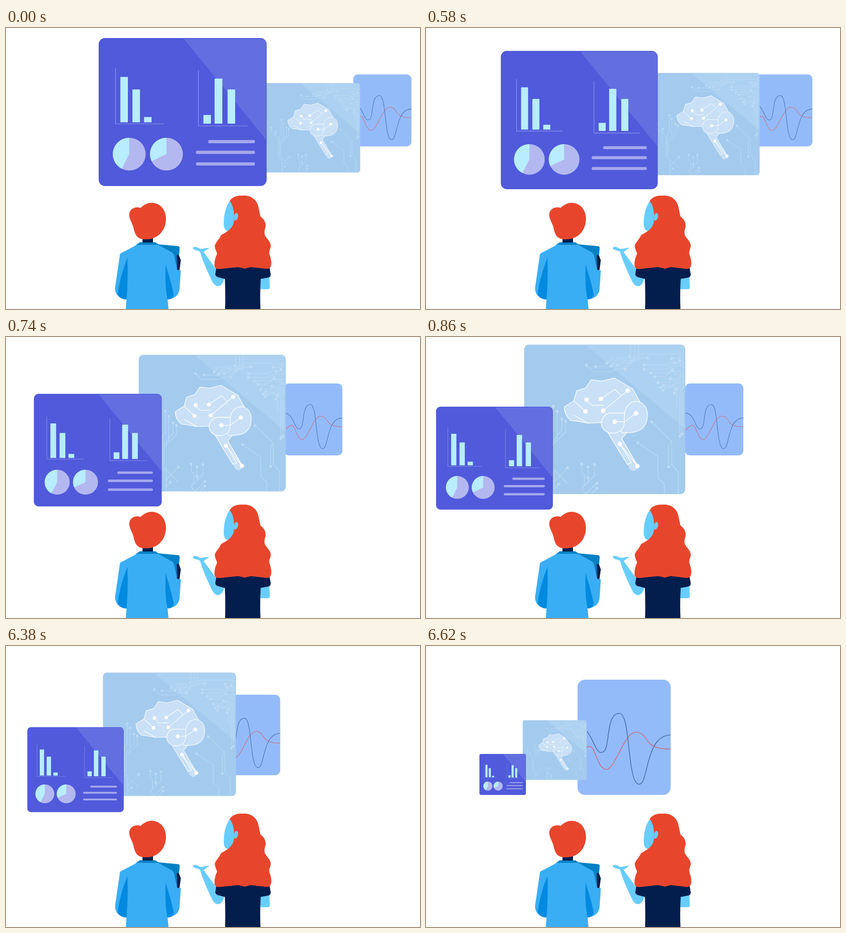
An HTML page that plays this animation: 907x617 px, repeating every 8000 ms.

```html
<!DOCTYPE html>
<html lang="en">
<head>
<meta charset="utf-8">
<title>Data panels</title>
<style>
  html, body { margin: 0; width: 100%; height: 100%; overflow: hidden; background: #fff; }
  svg { display: block; width: 100vw; height: 100vh; }
  .line { fill: none; }
  .hair { fill: #e8462c; }
  .navy { fill: #031e4d; }
  .skin { fill: #68cdfd; }
  .fold { fill: #028ae0; }
</style>
</head>
<body>
<svg viewBox="0 0 907 617">
  <defs>
    <marker id="dot" markerWidth="8" markerHeight="8" refX="4" refY="4" markerUnits="userSpaceOnUse">
      <circle cx="4" cy="4" r="3" fill="#c0dcf5"/>
    </marker>
    <clipPath id="screen"><rect x="215" y="16.5" width="353" height="328.5" rx="11"/></clipPath>
  </defs>

  <g id="waves">
    <rect x="332" y="74" width="204" height="253" rx="16" fill="#94bbf9"/>
    <g class="line" stroke-width="1.7">
      <path stroke="#c9707f" d="M332 240C343 230 350 220.500 359 220.500C371 221 376 271 395 271C415 271 434 189 460 189C477 189 483 207 490 214C500 223 515 227 536 226"/>
      <path stroke="#4473b0" d="M332 178C365 178 367 234 384 234C407 234 390 148 424 148C449 148 440 303.500 467 303.500C488 303.500 480 195 536 195.500"/>
    </g>
  </g>

  <g id="brain">
    <g clip-path="url(#screen)">
      <rect x="215" y="16.500" width="353" height="328.500" fill="#a4cbee"/>
      <path fill="#add2f1" d="M349 16.500H566V200Z"/>
      <g id="circuit" class="line" stroke="#c0dcf5" stroke-width="1.200"></g>
    </g>
    <g fill="#c9e0f6" stroke="#fff" stroke-width="1.400" stroke-linejoin="round">
      <path stroke="none" d="M398 209L443 283Q446 294 456 294Q465 291 466 283L429 223L440 210Z"/>
      <path d="M303 153L324 140L330 118L350 112L362 94L385 97L413 90L453 114L469 143L440 190L384 188L355 189L338 186L317 183Q303 171 303 153Z"/>
      <path d="M384 188Q389 167 405 167L435 167C438 151 448 142 460 141.500C477 142 486 156 485 173C484 198 470 213 431 210Z"/>
      <path d="M384 188Q389 167 405 167L435 167L434 190C434 203 423 211 409 211C393 211 384 200 384 188Z"/>
      <path class="line" d="M398 209L441 280L450 276L425 235L463 283.500L429 223L440 210M352 137.500L362 150H390M383 136L414 115L427 128M388 162L442 117.500M324 140L349.500 163.500M324 172L355 189M413.500 186H435L460 167.500"/>
    </g>
    <g id="nodes" fill="#fff"></g>
  </g>

  <g id="charts">
    <rect x="203" y="22" width="368" height="325" rx="14" fill="#505adb"/>
    <path fill="#636fe0" d="M390 24H557Q569.500 24 569.500 37V245Z"/>
    <path class="line" stroke="#949aea" stroke-width="1.200" d="M240 88V210.500H347M421.500 93V215H529"/>
    <path fill="#b7edff" d="M250.500 107.500h16.500V207h-16.500zM277 135h16.500V207h-16.500zM302.500 195.500h16.500V207h-16.500zM432.500 191h16.500V210h-16.500zM457 111h17V210h-17zM485.500 135h16.500V210h-16.500z"/>
    <g fill="#b4b8f0"><circle cx="270" cy="277" r="36"/><circle cx="351.500" cy="277" r="36"/></g>
    <path fill="#b7edff" d="M270 277L253.500 309A36 36 0 0 1 270 241ZM351.500 277L319 292.500A36 36 0 0 1 351.500 241Z"/>
    <path class="line" stroke="#a5a9ed" stroke-width="7" stroke-linecap="round" d="M446.500 249.500H542M419.500 273H542M419.500 298.500H542"/>
  </g>

  <g id="man">
    <path fill="#0680c5" d="M284 477L293 470.500H327L334 475L377 479Q381 480 380.500 484L376 531L340 520Z"/>
    <path class="navy" d="M299 460H322V471H299ZM374 499Q378 496 380 502L383 510L380 532H375Z"/>
    <path fill="#39aef4" d="M251 495L287 476H333L364 493Q367 495 368 499L375 531L383 532L380.500 570Q380 593 354 596L356 617H262.500L264 596Q238 592 239 570L249 502Q249 497 251 495Z"/>
    <path class="fold" d="M266 505C253 537 247 565 244.500 586Q251 596 264 596Q268 548 266 505ZM350 518C348 550 350 580 354 596Q365 596 367.500 586C363 560 354 535 350 518Z"/>
    <path class="hair" d="M295 395C302 388 312 383 322 384C341 386 351 402 350.500 421C349 447 331 465 305 464C290 464 283 457 280 441C277 428 270 420 270 410C270 398 282 391 295 395Z"/>
  </g>

  <g id="woman">
    <path class="skin" d="M409 483C412 479 418 480 423 484C430 487 437 482 446 483C440 486 437 489 433 492L460 529L478 551Q474 566 464 567Q456 566 451 555C440 532 431 512 425 491C420 488 410 488 409 483ZM556 547H577L578 569Q578 573.500 573 573.500H556ZM490 380C480 395 477 412 477 432Q478 444 486 446L506 430V390Z"/>
    <path class="navy" d="M461 524H577L580 541Q580 547 574 548L558 551Q556 585 557.500 617H480Q481 585 479.500 551L464 547Q457 544 459 538Z"/>
    <path class="hair" d="M490 380C496 371 505 368 515 368H524C542 369 551 382 553 393L557.500 414C566 420 570 428 568.500 438C566 445 566 448 567 455C572 464 581 470 580 480C578 488 576 490 577 496C580 505 582 512 581 520Q580 529 571 529L537 525Q530 526 523 528.500Q516 526 508 525L470 529Q458 530 457 523C456 515 458 505 462 497C463 492 459 490 457.500 480C457 472 466 467 471 455C482 449 499 440 499.500 422L500 412C499 397 496 387 490 380Z"/>
    <path class="skin" d="M500 412Q502 406 505 406Q509 407 508.500 414Q507 423 500 423Z"/>
  </g>
</svg>
<script>
const byId = id => document.getElementById(id);

// Circuit traces; the first point of each carries a dot.
const topTraces = `351.5 62L366 76H408L418 70H430L450 51H466V17|371.5 65H402L415 51H446L457 41V17
|396 58L408 46H440|406 64.5L414 57H446L466 37H565|420 62H426L437 51|436 71L460 46H485
|446 43L448 41V17|485 46H468|478 61.5H530L538 54H565|478 71H528L537 64H565|492 79H530L540 72
|501 87H524L536 76H565|538.5 47H552L557 42H565|556 51L565 60|544 58H556L565 67|540 72L548 83H565
|535 92H552L557 87H565|508 100H530L537 96H565|520 106H540L545 101H565|514 111H534L543 106H565
|519 117.5L525 111H565|544 123.5V114L550 108|556 218V120L565 111|561 213V122|549 115V152`;
const lowTraces = `494.5 186.5L538 229V280L553 296V345|531.5 285V238L538 229|464 232.5L508 262V310L522 322V345
|279 152V205L272 213V283L310 322|287 164V220L274 233|297.5 180V205L287 216|306 185.5V208L276 238V280
|242 181V196L268 222V285L281 298V345|258 197V212|310 287L281 317|291 323L281 333
|341 279V297L347 303V325L341 332L350 345|355 285.5V309|369 280V304L346 328|355 309V320
|374 321L350 345|374 332L362 345`;
byId('circuit').innerHTML = (topTraces + '|' + lowTraces).split('|')
  .map(d => `<path marker-start="url(#dot)" d="M${d}"/>`).join('');

const nodes = [[352, 137.5], [383, 136], [442, 117.5], [349.5, 163.5], [388, 162],
  [460, 167.5], [413.5, 186], [424.5, 235], [463, 283.5]];
byId('nodes').innerHTML = nodes.map(([x, y]) => `<circle cx="${x}" cy="${y}" r="5"/>`).join('');

// Poses are [centre x, centre y, height]; home is the pose each panel is drawn in.
// Each move is a Bezier curve through poses.
const panels = [
  { id: 'charts', home: [387, 184.5, 325],
    first: [[387, 184.5, 325], [150, 266, 226]],
    second: [[150, 266, 226], [152, 276, 158], [168, 282, 90]] },
  { id: 'brain', home: [391.5, 180.75, 328.5],
    first: [[670.5, 219.25, 196.5], [391.5, 180.75, 328.5]],
    second: [[391.5, 180.75, 328.5], [332.6, 203, 230], [282, 228.5, 131]] },
  { id: 'waves', home: [434, 200.5, 253],
    first: [[824.5, 181, 158], [631.5, 181, 158]],
    second: [[631.5, 181, 158], [469, 207, 158], [486, 195, 250], [434, 200.5, 253]] }
];

function bezier(points, p) {
  if (points.length === 1) return points[0];
  return bezier(points.slice(1).map((b, i) =>
    b.map((v, j) => points[i][j] + (v - points[i][j]) * p)), p);
}
const smooth = t => t * t * (3 - 2 * t);
const lag = t => t - 0.46 * t * t * (1 - t);
// Ten 40 ms steps, the first taken at the start time.
const steps = (t, start) => Math.max(0, Math.min(10, Math.floor((t - start) / 40) + 1)) / 10;

function draw(now) {
  const t = now % 8000;
  const late = steps(t, 6260);
  for (const { id, home, first, second } of panels) {
    const [x, y, h] = late ? bezier(second, smooth(lag(late)))
      : bezier(first, smooth(steps(t, 500)));
    byId(id).setAttribute('transform',
      `translate(${x} ${y}) scale(${h / home[2]}) translate(${-home[0]} ${-home[1]})`);
  }
}

const start = performance.now();
function tick() {
  draw(performance.now() - start);
  requestAnimationFrame(tick);
}
tick();
</script>
</body>
</html>
```
